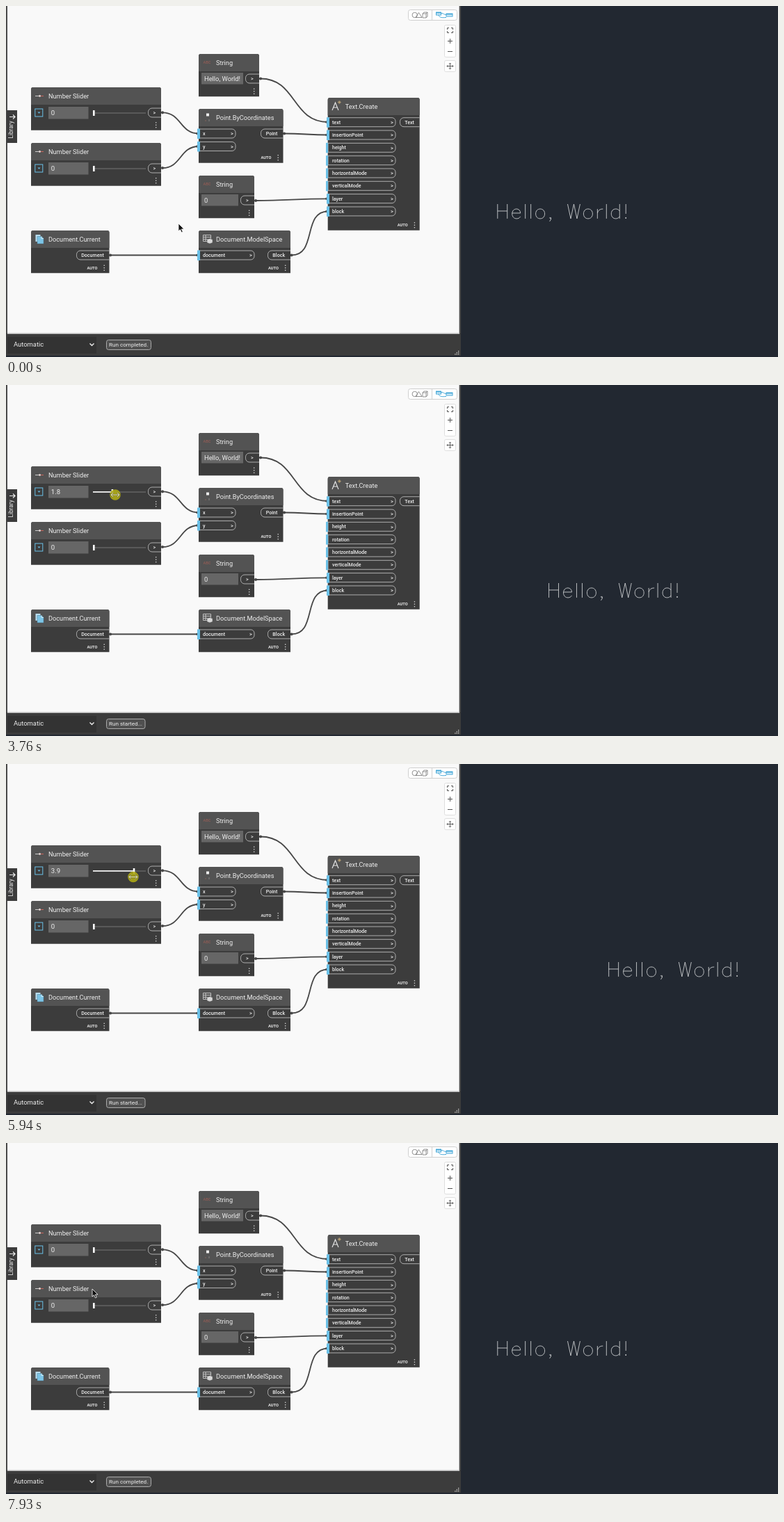
An HTML page with a canvas that plays this animation: 1110x505 px, repeating every 8000 ms.

```html
<!DOCTYPE html>
<html lang="en">
<head>
<meta charset="utf-8">
<style>
  html, body { margin: 0; width: 100%; height: 100%; overflow: hidden; background: #222831; }
  canvas { display: block; }
</style>
</head>
<body>
<canvas id="stage"></canvas>
<script>
const W = 1110, H = 505, LOOP = 8000;
const canvas = document.getElementById('stage');
const ratio = window.devicePixelRatio || 1;
canvas.width = W * ratio;
canvas.height = H * ratio;
canvas.style.width = W + 'px';
canvas.style.height = H + 'px';
const c = canvas.getContext('2d');

const BODY = '#3c3c3c', HEADER = '#535353', BLUE = '#6ac0e7', WIRE = '#474747';
const LIGHT = '#eeeeee', OUTLINE = '#adadad';

// time, pointer x, pointer y, slider value
const KEYS = [
  [0, 248, 313, 0], [70, 246, 310, 0], [350, 203, 250, 0], [620, 153, 184, 0], [840, 135, 159, 0],
  [1000, 131, 157, 0], [1270, 128.5, 156, 0], [2400, 129, 156, 0], [2460, 129.5, 156, .1],
  [2670, 129.5, 156, .1], [3210, 133.5, 157, .4], [3760, 157, 158, 1.8], [4030, 168, 159, 2.6],
  [4850, 197.5, 161, 4.7], [5060, 202, 161.5, 5], [5520, 202, 161.5, 5], [5940, 183, 162.5, 3.9],
  [6290, 166, 163, 2.7], [6700, 150, 163, 1.7], [7110, 132, 163, .5], [7380, 124, 163, 0],
  [7580, 124, 163, 0], [7930, 124, 210, 0], [LOOP, 124, 210, 0]
];

function poseAt(t) {
  const i = KEYS.findIndex(key => key[0] > t);
  const a = KEYS[i - 1], b = KEYS[i];
  const k = (t - a[0]) / (b[0] - a[0]);
  return [1, 2, 3].map(n => a[n] + (b[n] - a[n]) * k);
}

function rect(x, y, w, h, color) {
  c.fillStyle = color;
  c.fillRect(x, y, w, h);
}

function rounded(x, y, w, h, radii, fill, stroke) {
  c.beginPath();
  c.roundRect(x, y, w, h, radii);
  if (fill) { c.fillStyle = fill; c.fill(); }
  if (stroke) { c.strokeStyle = stroke; c.lineWidth = 1; c.stroke(); }
}

function path(d, stroke, width = 1, fill) {
  const shape = new Path2D(d);
  if (fill) { c.fillStyle = fill; c.fill(shape); }
  if (stroke) { c.strokeStyle = stroke; c.lineWidth = width; c.stroke(shape); }
}

function dot(x, y, r, color) {
  c.beginPath();
  c.arc(x, y, r, 0, 7);
  c.fillStyle = color;
  c.fill();
}

function label(text, x, y, size, { color = LIGHT, weight = 400, align = 'left' } = {}) {
  c.font = `${weight} ${size}px Roboto, sans-serif`;
  c.textAlign = align;
  c.textBaseline = 'alphabetic';
  c.fillStyle = color;
  c.fillText(text, x, y + size * .355);
}

function node(x, y, w, h, title, auto) {
  rounded(x, y, w, h, [3, 3, 0, 0], BODY);
  rounded(x, y, w, 25, [3, 3, 0, 0], HEADER);
  label(title, x + 25, y + 12.4, 9.2);
  for (const dy of [-3.5, 0, 3.5]) dot(x + w - 7.3, y + h - 7.5 + dy, .8, '#ddd');
  if (auto) label('AUTO', x + w - 24.5, y + h - 7.3, 5.7, { weight: 700, align: 'center' });
}

function inPort(name, x, y, w, linked = true) {
  rounded(x, y - 6.5, w, 13, [0, 5, 5, 0], null, OUTLINE);
  rect(x - (linked ? 2 : 3), y - 7, linked ? 4 : 3, 14.5, BLUE);
  label(name, x + 6, y, 7.1, { weight: 500 });
  label('>', x + w - 5, y, 7.5, { weight: 500, align: 'center' });
}

function outPort(name, x, y, right) {
  const w = right - x;
  c.beginPath();
  c.moveTo(right, y - 6.5);
  c.arcTo(x, y - 6.5, x, y, 5.5);
  c.arcTo(x, y + 6.5, right, y + 6.5, 5.5);
  c.lineTo(right, y + 6.5);
  c.strokeStyle = OUTLINE;
  c.lineWidth = 1;
  c.stroke();
  label(name, x + w / 2 - .5, y, 7.1, { weight: 500, align: 'center' });
}

function wire(x1, y1, x2, y2) {
  const reach = .45 * Math.hypot(x2 - x1, y2 - y1);
  path(`M${x1} ${y1}C${x1 + reach} ${y1} ${x2 - reach} ${y2} ${x2} ${y2}`, WIRE, 1.8);
  dot(x1, y1, 2.1, WIRE);
  dot(x2 - 2, y2, 1.8, WIRE);
}

function sliderNode(y, value) {
  node(36, y, 187, 61.7, 'Number Slider');
  path(`M42 ${y + 12.5}h5`, '#ccc', 1);
  path(`M50 ${y + 12.5}h4`, '#c4645a', 1);
  dot(48.5, y + 12.5, 1.4, '#e8d8d6');
  c.strokeStyle = BLUE;
  c.lineWidth = 1;
  c.strokeRect(41.8, y + 31, 11, 11);
  path(`M45.5 ${y + 35.5}h4l-2 2.3z`, null, 0, BLUE);
  rect(61, y + 28, 57.5, 17.5, '#666');
  label(String(+value.toFixed(1)), 64.8, y + 37, 9.6);
  const thumb = 126.3 + value * 14.8;
  rect(125, y + 36.5, 76, 1, '#777');
  rect(125, y + 36.1, thumb - 125, 1.6, '#fff');
  rect(thumb - 1.3, y + 33, 2.6, 8, '#fff');
  outPort('>', 204.5, y + 36.5, 223);
}

function stringNode(x, y, w, text, fieldWidth) {
  node(x, y, w, 61.2, 'String');
  label('ABC', x + 12, y + 12, 5.6, { color: '#a35f56', align: 'center' });
  rect(x + 4, y + 27, fieldWidth, 16.5, '#666');
  label(text, x + 8, y + 35.5, 9.3);
  outPort('>', x + w - 19.5, y + 35.5, x + w);
}

function toolbar() {
  rounded(578.5, 5.5, 70, 15, 3, '#fff', '#cfcfcf');
  path('M612.5 6V20', '#cfcfcf');
  path('M584 13a3.7 3.7 0 1 0 7.4 0a3.7 3.7 0 1 0-7.4 0M589 16.5l4.5-7 4.5 7zM599 11h5v6h-5zl2-2h5v6l-2 2M604 11l2-2', '#777', .8);
  path('M622 13C623 17 627 17 633 16.500M626 10.500C630 10.500 629 12.500 633 12.500', '#47a8d8', 1);
  for (const [x, y, w] of [[618, 8.5, 8], [632.5, 10.5, 10]]) {
    rect(x, y, w, 5, '#47a8d8');
    rect(x + 1, y + 2, w - 2, 2, '#d7effa');
  }
  rounded(630.5, 27.5, 16, 46, 2, '#fff', '#dedede');
  rounded(630.5, 78.5, 16, 16, 2, '#fff', '#dedede');
  path('M634.5 34v-2.5h2.5M640 31.5h2.5v2.5M642.5 36v2.5H640M637 38.5h-2.5V36M635 50.5h7M638.5 47v7M635 65.5h7', '#555', 1);
  path('M634 86.5h9M638.5 82v9M635.5 85l-1.5 1.5 1.5 1.5M641.5 85l1.5 1.5-1.5 1.5M637 83.5l1.5-1.5 1.5 1.5M637 89.5l1.5 1.5 1.5-1.5', '#555', .9);
}

function libraryTab() {
  rect(1, 150, 15, 47, BODY);
  path('M5 159.5h8M10 156.5l3 3-3 3', '#eee', 1.2);
  c.save();
  c.translate(7.5, 178);
  c.rotate(-Math.PI / 2);
  label('Library', 0, 0, 8.3, { align: 'center' });
  c.restore();
}

function statusBar(running) {
  rect(0, 471, 654, 32, BODY);
  rect(2, 470.5, 650, 1.5, '#bdbdbd');
  rect(2, 476, 128, 24, '#333');
  label('Automatic', 11, 487, 9.4);
  path('M120.5 485.5l3 3 3-3', '#eee', 1.4);
  rounded(144.5, 480.5, running ? 55.5 : 64, 14, 3, '#505050', '#aaa');
  label(running ? 'Run started...' : 'Run completed.', 148, 487.2, 8.1);
  for (let i = 0; i < 3; i++)
    for (let j = 0; j <= i; j++) rect(650 - j * 2.4, 496 + i * 2.2, 1.3, 1.3, '#ccc');
}

function titleIcons() {
  rect(288, 154.5, 4, 4, '#eee');
  rect(286, 164, 2, 2, '#6b5b58');
  rect(291, 163, 2, 3, '#6b6b6b');

  path('M42.5 329h7v10h-7z', null, 0, '#b8def0');
  path('M45 331.5h6l3 3V342h-9z', '#4f7890', .5, '#7cc4e6');
  path('M51 331.5v3h3', '#e7f6fd', .8);

  path('M283.5 329.5h11v9h-11zM283.5 332.5h11M283.5 335.5h11M287 329.5v9', '#ccc', .9);
  path('M289 336l4-1.5 4 1.5v4.5l-4 1.5-4-1.5z', '#555', .5, '#d8d8d8');

  path('M469 150l4.5-11 4.5 11M470.8 146h5.4', '#e8e8e8', 1.1);
  path('M479.3 136v5M476.8 138.5h5M477.6 136.8l3.4 3.4M481 136.8l-3.4 3.4', '#c9ae7d', .7);
}

function graph(value) {
  wire(225, 153.3, 277, 183.5);
  wire(225, 233, 277, 202);
  wire(366, 104.5, 463, 167);
  wire(400, 183.5, 463, 185.5);
  wire(359, 280, 463, 277.3);
  wire(150, 358.5, 277, 358.5);
  wire(410.5, 358.5, 463, 295.5);

  sliderNode(117, value);
  sliderNode(197, 0);
  stringNode(277, 69, 87, 'Hello, World!', 60);
  stringNode(277, 244, 80, '0', 53);

  node(277, 148, 121.5, 77.7, 'Point.ByCoordinates', true);
  inPort('x', 277, 183.5, 53);
  inPort('y', 277, 202, 53);
  outPort('Point', 366.5, 183.5, 398.5);

  node(36, 323, 112.5, 61.2, 'Document.Current', true);
  outPort('Document', 101.5, 358.5, 148.5);

  node(277, 323, 132, 61.2, 'Document.ModelSpace', true);
  inPort('document', 277, 358.5, 80);
  outPort('Block', 376.5, 358.5, 409);

  node(462.7, 132, 132, 190.7, 'Text.Create', true);
  ['text', 'insertionPoint', 'height', 'rotation', 'horizontalMode', 'verticalMode', 'layer', 'block']
    .forEach((name, i) => inPort(name, 463, 167.2 + i * 18.32, 97, i < 2 || i > 5));
  outPort('Text', 566.5, 167.2, 594.7);
  titleIcons();
}

// Single-stroke letters, y downwards from the cap line, baseline at 21
const STROKES = {
  H: [22, 'M4 0V21M18 0V21M4 10H18'],
  e: [18, 'M3 13H15C15 9 12 7 9.5 7C5.500 7 3 10 3 14S5.500 21 9.5 21C12 21 13.500 20 15 18'],
  l: [8, 'M4 0V21'],
  o: [19, 'M9.500 7C5.500 7 3 10 3 14S5.500 21 9.500 21S16 18 16 14S13.500 7 9.500 7'],
  ',': [10, 'M6 20L5 21L4 20L5 19L6 20V22L4 25'],
  ' ': [17, ''],
  W: [23, 'M3 0L7.500 21L12 0L16.500 21L21 0'],
  r: [13, 'M4 7V21M4 13C5 9 7.500 7 12 7'],
  d: [19, 'M15 0V21M15 10C13.500 8 12 7 9.500 7C5.500 7 3 10 3 14S5.500 21 9.500 21C12 21 13.500 20 15 18'],
  '!': [10, 'M5 0V14M5 19L4.500 20L5 21L5.500 20Z']
};

function drawing(value) {
  c.save();
  c.translate(702.8 + value * 41, 285);
  c.scale(.997, .997);
  for (const letter of 'Hello, World!') {
    const [advance, d] = STROKES[letter];
    path(d, '#d6d8da', .85);
    c.translate(advance, 0);
  }
  c.restore();
}

function pointer(t, x, y) {
  if (t < 1000 || t >= 7640) {
    path(`M${x} ${y}v11l2.500-2.300 1.900 4.200 1.900-.8-1.900-4.100h3.600z`, '#fff', .8, '#111');
    return;
  }
  if (t >= 2000 && t < 7580) dot(x, y, 7.8, 'rgba(176, 172, 22, .88)');
  const arrows = `M${x - 6} ${y}h12M${x - 3} ${y - 3}l-3 3 3 3M${x + 3} ${y - 3}l3 3-3 3`;
  path(arrows, '#6b6a2a', 1.8);
  path(arrows, '#ecebbd', 1);
}

function draw(t) {
  const [x, y, exact] = poseAt(t);
  const value = Math.round(exact * 10) / 10;
  const dragging = t > 2700 && t < 5060 || t > 5520 && t < 7380;
  c.setTransform(ratio, 0, 0, ratio, 0, 0);
  rect(0, 0, W, H, '#222831');
  rect(0, 0, 654, 503, '#4b4b4b');
  rect(2, 0, 649, 471, '#f9f9f9');
  rect(651, 0, 1, 471, '#bdbdbd');
  graph(value);
  toolbar();
  libraryTab();
  statusBar(dragging && t % 218 < 120);
  drawing(value);
  pointer(t, x, y);
}

function tick(now) {
  draw(now % LOOP);
  requestAnimationFrame(tick);
}
draw(0);
requestAnimationFrame(tick);
</script>
</body>
</html>
```
